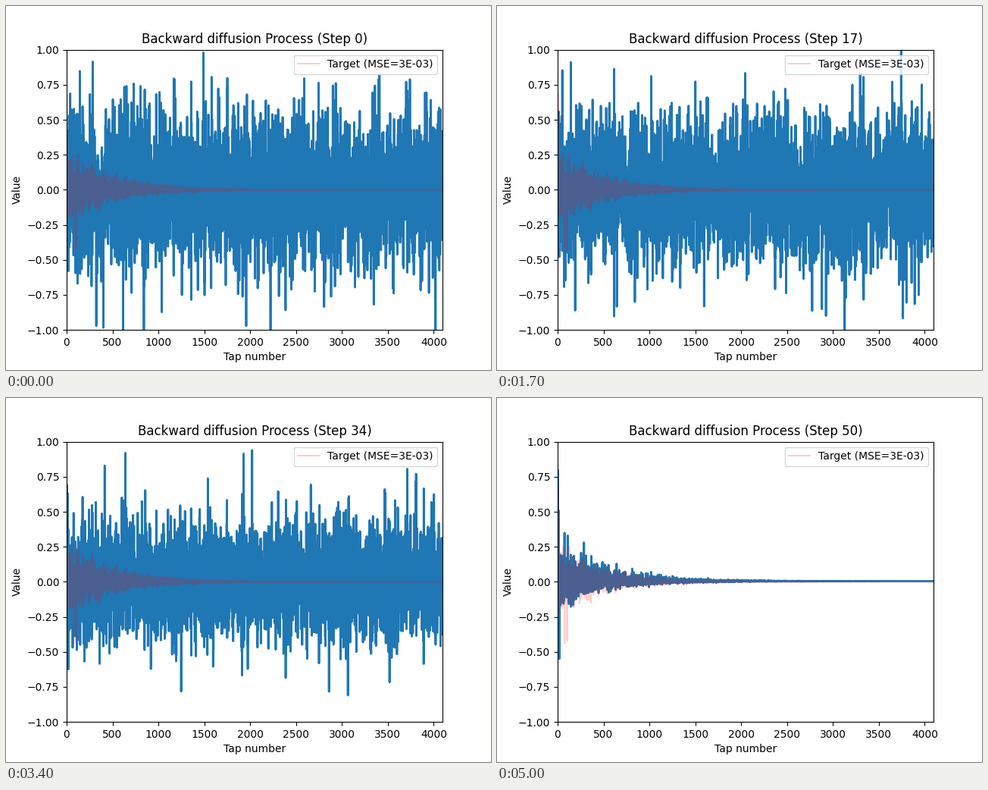
A matplotlib script that plays this animation: 640x480 px, repeating every 10 s.

```python
import numpy as np
import matplotlib.pyplot as plt
from matplotlib.animation import FuncAnimation

TAPS, STEPS, FRAMES = 4096, 50, 100
KEEP = 0.95  # share of the noise that survives each step
FADE = 9     # steps over which an outlier grows and fades

# A few outliers: tap, value, step of their peak
OUTLIERS = [(1490, 0.98, 0), (3700, 1.1, 4), (1037, -1.05, 13),
            (2055, -1.05, 13), (2480, 0.98, 20), (920, 0.98, 22),
            (3225, -0.97, 22), (640, 0.92, 34), (3065, -0.81, 34)]

rng = np.random.default_rng(12)
tap = np.arange(TAPS)


def decay(height, length):
    return height * np.exp(-tap / length)


def spread(step):
    """Noise level: a dip near step 5, a plateau, then a fall to zero."""
    return np.interp(step, [0, 5, 13, 24, 34, 42, STEPS],
                     [0.245, 0.185, 0.23, 0.25, 0.195, 0.132, 0])


def make_responses():
    shape, other = rng.standard_normal((2, TAPS)).clip(-2.9, 2.9) / 2.7
    target = decay(0.34, 500) * np.where(shape < 0, 0.85, 1) * shape
    target[[0, 8, 75, 104]] = -1.1, 0.68, -0.44, -0.42

    mix = 0.75 * shape + 0.66 * other
    guess = decay(0.36, 540) * np.where(mix < 0, 0.65, 1) * mix + 0.005
    guess[[3, 75, 110]] = 0.8, 0.35, 0.33
    return target, guess


def make_waves(guess):
    z = rng.standard_normal(TAPS)
    waves = []
    for step in range(STEPS + 1):
        share = 0.2 + 0.8 * (step / STEPS) ** 2
        wave = share * guess + spread(step) * z * (1 + 0.02 * z ** 2)
        for at, value, peak in OUTLIERS:
            weight = max(0, 1 - abs(step - peak) / FADE)
            wave[at] += weight * (value - wave[at])
        # the strong first swing of the response
        wave[12] = np.interp(step, [0, 22, 42, STEPS], [0.35, 0.62, 0.64, 0.51])
        wave[18] = np.interp(step, [0, 22, 42, STEPS], [-0.58, -0.45, -0.74, -0.55])
        waves.append(wave)
        z = KEEP * z + np.sqrt(1 - KEEP ** 2) * rng.standard_normal(TAPS)
    return waves


target, guess = make_responses()
waves = make_waves(guess)

fig, ax = plt.subplots(figsize=(6.4, 4.8), dpi=100)
line, = ax.plot(tap, waves[0], color="tab:blue", linewidth=2)
ax.plot(tap, target, color="red", alpha=0.2, label="Target (MSE=3E-03)")
ax.set(xlim=(0, TAPS), ylim=(-1, 1), xlabel="Tap number", ylabel="Value")
ax.legend(loc="upper right")
title = ax.set_title("")


def draw(frame):
    step = min(frame, STEPS)
    line.set_ydata(waves[step])
    title.set_text(f"Backward diffusion Process (Step {step})")
    return line, title


anim = FuncAnimation(fig, draw, frames=FRAMES, interval=100, repeat=True)
plt.show()
```
